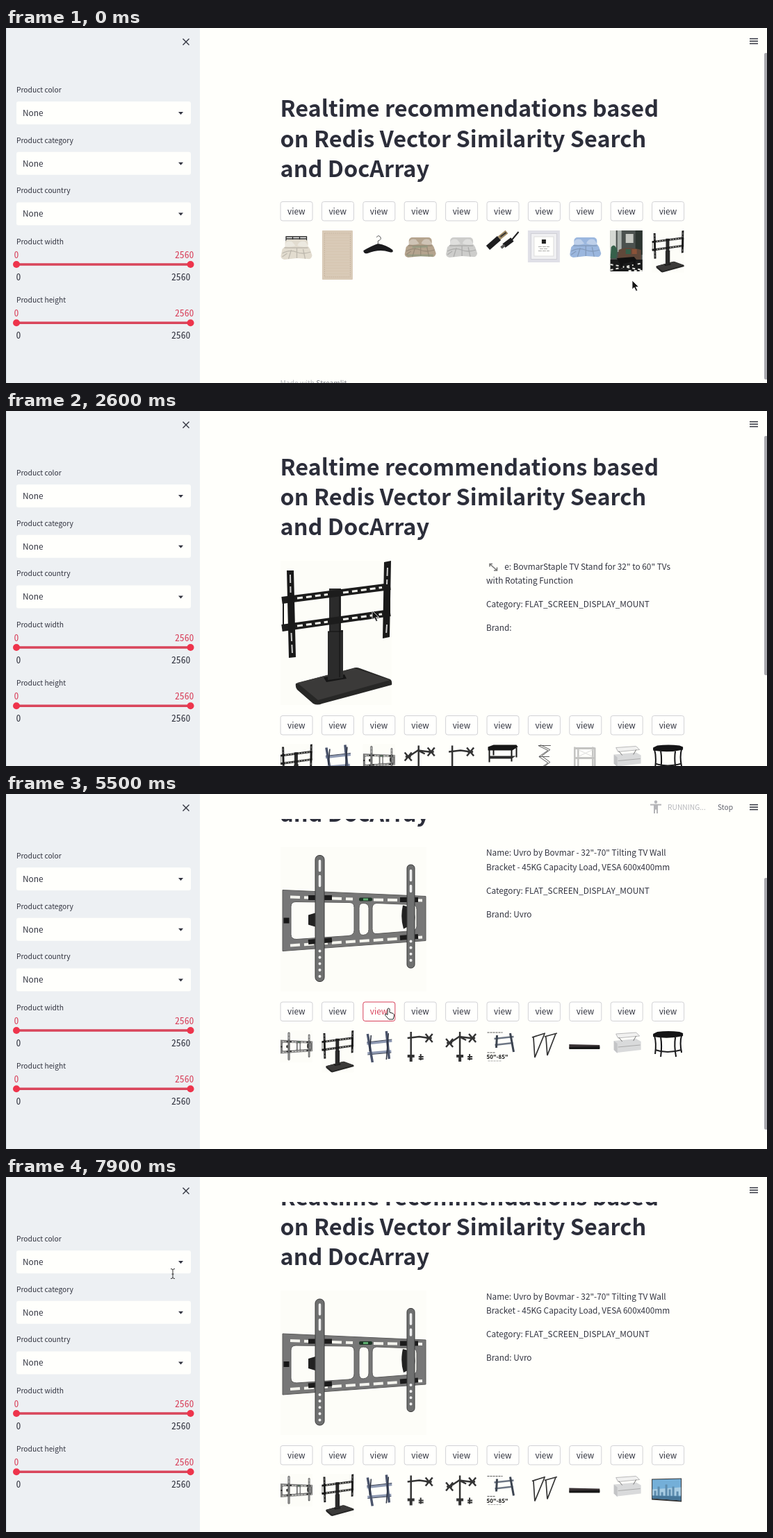
An HTML page that plays this animation: 1095x512 px, repeating every 8000 ms.

```html
<!DOCTYPE html>
<html lang="en">
<head>
<meta charset="utf-8">
<title>Product recommendations</title>
<style>
html, body { margin: 0; width: 100%; height: 100%; overflow: hidden; background: #fffffb }
svg { display: block; width: 1095px; height: 512px; font: 11.83px "Noto Sans CJK SC", "Noto Sans CJK JP", "Noto Sans", sans-serif; fill: #31333f }
.small { font-size: 10.25px }
.mono { font: 13.68px "Noto Sans Mono CJK SC", "Noto Sans Mono CJK JP", monospace }
.title { font-size: 32.45px; font-weight: 700; fill: #2c2e3a }
.red { fill: #d8405a }
.line { fill: none; stroke: currentColor }
.btn rect { fill: #fffffd; stroke: #d2d2d6 }
.btn text { text-anchor: middle }
.btn.hover rect, .btn.focus rect { stroke: #d8405a }
.btn.hover text, .btn.focus text { fill: #d8405a }
.btn.focus rect { stroke: #e5566b; stroke-width: 2; filter: drop-shadow(0 0 1.5px #f0455d) }
</style>
</head>
<body>
<svg viewBox="0 0 1095 512" xmlns="http://www.w3.org/2000/svg">
<defs>
  <clipPath id="view"><rect x="279" y="36" width="816" height="476"/></clipPath>

  <g id="stand">
    <rect width="160" height="208" fill="#fdfdf8"/>
    <path fill="#272726" d="M22 177L104 155Q109 153 114 155L158 171Q161 173 160 179L60 206Q53 209 47 206L24 186Q21 183 22 177Z"/>
    <path fill="#3b3a39" d="M24 176L106 155L158 172L54 201Z"/>
    <path fill="#161616" d="M62 168L92 164L95 170L66 175Z"/>
    <path fill="#2b2b2b" d="M70 40H87V100H90V169L68 172V102H70Z"/>
    <path stroke="#111" d="M68 102H90M85 42V168" fill="none"/>
    <path stroke="#1c1c1c" stroke-width="10" d="M2 57L158 37M2 97L158 75"/>
    <path stroke="#1c1c1c" stroke-width="2" d="M4 56V98M157 37V76"/>
    <path stroke="#f4f4ee" stroke-width="3" stroke-dasharray="8 5" d="M24 54L68 48.500M90 46L146 38.500M24 94L68 88M90 84.500L146 77"/>
    <path fill="#191919" d="M9 14H19L22 139L12 140ZM149 2L159 0L157 110L147 112Z"/>
    <path stroke="#ccc" stroke-width="2" stroke-dasharray="12 5" d="M15.500 104L17 134M153 92L152 107M14 20L14.500 46M154 10L153 34"/>
  </g>

  <g id="bracket">
    <rect width="210" height="208" fill="#fdfdf8"/>
    <path fill="#777" stroke="#5a5a5a" fill-rule="evenodd" d="M3 62L209 71V135L3 150Z
      M22 79Q15 79 15 86V126Q15 133 23 133L98 128Q106 127 106 120V87Q106 80 99 80Z
      M119 81Q113 81 113 88V119Q113 127 119 127Q127 126 127 119V88Q127 81 119 81Z
      M138 81Q132 82 132 88V118Q132 126 139 125L189 121Q196 120 196 114V90Q196 83 189 83Z"/>
    <path stroke="#f4f4ee" stroke-width="4" stroke-dasharray="14 6" d="M14 72L104 75M134 76L204 77M14 142L204 130"/>
    <path stroke="#1b1b1b" stroke-width="7" d="M40 73H74M40 137L74 134M172 76H198M172 131L198 129"/>
    <path fill="#222" d="M40 98L50 95V115L40 112ZM176 84Q172 102 177 118L183 115V86ZM191 88Q196 102 191 114Z"/>
    <g fill="#6f7070" stroke="#3a3a3a">
      <rect x="50" y="12" width="13" height="182" rx="6"/>
      <rect x="182" y="25.500" width="11" height="149" rx="5"/>
    </g>
    <path class="line" color="#eee" stroke-width="3.500" stroke-linecap="round" stroke-dasharray="14 8" d="M56.500 20V62M187.500 34V64"/>
    <path class="line" color="#eee" stroke-width="4" stroke-linecap="round" stroke-dasharray=".1 9" d="M56.500 150V190M187.500 136V170"/>
    <rect x="113" y="73" width="19" height="5" rx="2" fill="#1d3526"/>
    <rect x="119" y="74" width="7" height="3" fill="#5fae70"/>
    <rect x="4.500" y="102" width="8" height="8" fill="#161616"/>
  </g>

  <g id="bed">
    <rect x="7" y="10" width="33" height="14" rx="5" fill="currentColor"/>
    <path fill="currentColor" d="M3 24Q8 18 16 17L32 17Q41 18 43 24L46 33Q45 39 40 38L24 37L6 39Q1 38 1 34Z"/>
    <path fill="#fff" opacity=".35" d="M7 17Q9 11 17 13L22 19Q14 22 7 20ZM25 18Q28 11 36 13L41 20Q32 22 25 19Z"/>
    <path class="line" color="#000" opacity=".16" stroke-width="1.300" d="M3 30Q14 24 23 28T44 28M12 38L16 25M24 37V22M36 38L33 24M3 35L10 30M6 22L40 22"/>
  </g>
  <g id="whiteBed">
    <path class="line" color="#292929" stroke-width="1.300" d="M8.500 25V9H38V24M8.500 12H38M18 9V18M28 9V18"/>
    <use href="#bed" y="3" color="#e2dccf"/>
  </g>
  <g id="brownBed"><use href="#bed" color="#b5a48e"/><path stroke="#86967c" stroke-width="3" opacity=".55" d="M4 36L42 36M12 24L34 23"/></g>
  <use id="greyBed" href="#bed" color="#cdcdcb"/>
  <use id="blueBed" href="#bed" color="#9bb7de"/>
  <g id="rug">
    <rect x="1" width="44" height="71" rx="1" fill="#d9cab7"/>
    <path class="line" color="#c8b59f" stroke-dasharray="2 1" d="M4.500 4H41.500V67H4.500Z"/>
    <path class="line" color="#cdbca6" stroke-width="34" stroke-dasharray="1 3" d="M23 6V66" opacity=".35"/>
  </g>
  <g id="hanger">
    <path fill="#1b1b1d" d="M1 29Q13 22 22 19Q34 21 43 28Q45 33 38 31Q24 26 7 33Q1 34 1 29Z"/>
    <path class="line" color="#555" d="M22 20V15Q28 13 25 9Q22 6 20 10"/>
  </g>
  <g id="cable" fill="none">
    <path stroke="#1d1d1f" stroke-width="8" d="M2 25L18 11"/>
    <path stroke="#a08b66" stroke-width="6" d="M18 11L29 2"/>
    <path stroke="#333" stroke-width="2" d="M20 9L28 3"/>
    <path stroke="#1d1d1f" stroke-width="7" d="M25 22L37 13"/>
    <path stroke="#555" stroke-width="4" d="M21 25L26 21"/>
    <path stroke="#222" stroke-width="2" d="M36 14L46 2"/>
  </g>
  <g id="photoFrame">
    <rect width="46" height="46" fill="#e0e0e7"/>
    <rect x="4.500" y="4.500" width="37" height="37" fill="#f1f1f3" stroke="#cfcfd6"/>
    <rect x="9" y="9" width="28" height="28" fill="#fffffc" stroke="#ddd"/>
    <rect x="20" y="13" width="6" height="6" fill="#222"/>
    <path stroke="#aaa" stroke-dasharray="5 1" d="M15 23.500H31M17 26.500H29M15 29.500H31"/>
  </g>
  <g id="room">
    <rect width="46" height="59" fill="#4b514e"/>
    <path fill="#d5d9d3" d="M0 0H8V34H0Z"/>
    <path fill="#aab1ac" d="M10 0H16V31H10Z"/>
    <path fill="#c6c8c2" d="M22 5H33V18H22Z"/>
    <path fill="#2d3530" d="M36 0H46V35H36Z"/>
    <path fill="#60483a" d="M12 28Q24 22 44 28V43H10Z"/>
    <path fill="#35604a" d="M1 24Q6 17 10 29L8 40H0ZM22 27H29V34H22Z"/>
    <path fill="#8a5238" d="M31 27H38V34H31Z"/>
    <path fill="#1a1b1b" d="M0 42H46V59H0Z"/>
    <path stroke="#e4e4df" stroke-width="2" stroke-dasharray="4 4" d="M0 49L46 57M0 57L46 47M26 58H46"/>
    <path fill="#111" d="M9 40L34 38L38 43L14 49ZM14 46H18V54H14ZM33 43H36V51H33Z"/>
  </g>

  <g id="standThumb"><use href="#stand" transform="scale(.291)"/></g>
  <g id="bracketThumb"><use href="#bracket" transform="scale(.222)"/></g>
  <g id="tilt" fill="none">
    <path stroke="#8f9ab3" stroke-width="3.500" d="M6 19L42 15M7 33L41 30"/>
    <path stroke="#3f4658" d="M6 17L42 13M7 35L41 32"/>
    <path stroke="#4b546b" stroke-width="3.500" d="M7 5L14 46M34 1L38 41"/>
    <path stroke="#252b3a" stroke-width="1.500" d="M12 7L10 30M37 4L34 42"/>
  </g>
  <g id="vesa"><path class="line" stroke-width="2.500" d="M-5 -6L5 6M-5 6L5 -6M-4 0H4"/></g>
  <g id="clamp" color="#333">
    <path class="line" stroke-width="2.500" d="M0 2V36"/>
    <path class="line" stroke-width="4" d="M-5 37H5M0 38V45"/>
    <path class="line" stroke="#777" stroke-width="2" d="M11 38H18M14 34V43M11 41L18 41"/>
  </g>
  <g id="dualArm" color="#333">
    <use href="#clamp" x="21"/>
    <path class="line" stroke-width="2.500" d="M8 17L20 9L36 11M20 9L30 14"/>
    <use href="#vesa" x="6" y="18"/><use href="#vesa" x="39" y="11"/>
  </g>
  <g id="arm" color="#333">
    <use href="#clamp" x="10"/>
    <path class="line" stroke-width="2.500" d="M5 11L22 9L36 11"/>
    <use href="#vesa" x="36" y="11"/>
  </g>
  <g id="coffee">
    <path fill="#161616" d="M2 4L10 1H43L45 4L37 9H2Z"/>
    <path stroke="#161616" stroke-width="2" d="M4 8V26M36 8V25M43 5V19M10 8V16"/>
    <path fill="#2a2a2a" d="M4 17H42L36 21H4Z"/>
  </g>
  <g id="zigzag" class="line" color="#5c5c5c">
    <path d="M15 2L29 9L16 18L29 27L16 36L28 43M18 1L32 8L20 17L32 26L20 35L32 42M15 2H33M16 18H31M15 35H31"/>
    <path stroke-width="2.500" d="M14 44L32 41"/>
  </g>
  <g id="shelf" class="line" color="#c4c4c2">
    <path stroke-width="2.500" d="M8 4V66M34 4V68M13 5V62M37 5V64"/>
    <path stroke-width="3" d="M8 6H37M8 20H37M8 34H37M8 48H37M8 62H37"/>
    <path stroke="#ddd" d="M13 8L34 18M34 8L13 18M13 36L34 46M34 36L13 46"/>
  </g>
  <g id="lift">
    <path fill="#d9dadb" d="M5 15L37 12L44 16V28L10 32L5 28Z"/>
    <path fill="#c3c4c6" d="M5 15L10 19V33L5 28Z"/>
    <path fill="#f1f1f0" stroke="#b9b9ba" d="M8 5L37 3L42 8L11 11Z"/>
    <path class="line" color="#777" d="M12 10L17 16M37 8L33 15"/>
    <path stroke="#aaa" d="M11 24L43 21"/>
  </g>
  <g id="console">
    <path fill="#141416" d="M2 5L8 2Q24 0 40 2L45 4V8Q24 13 2 9Z"/>
    <path class="line" color="#141416" stroke-width="2" d="M4 8Q7 18 5 34M13 10Q15 22 13 38M34 10Q32 22 35 38M43 7Q40 18 43 32"/>
    <path class="line" color="#202022" stroke-width="2" d="M5 28Q22 34 43 28"/>
  </g>
  <g id="wallMount">
    <path class="line" color="#6d7684" stroke-width="2.500" d="M11 12L39 9M12 21L38 18"/>
    <path class="line" color="#3c4450" stroke-width="3" d="M15 7L14 25M34 4L39 31"/>
    <path class="line" color="#555" stroke-dasharray="3 1" d="M1 3H23M1 32H13"/>
    <text x="0" y="41" font-size="8" font-weight="700" fill="#111">50"-85"</text>
    <path class="line" color="#aaa" stroke-dasharray="3 1" d="M2 44H22"/>
  </g>
  <path id="triangles" class="line" color="#333" stroke-width="1.700" d="M6 10L25 4M8 9L10 39L24 5M24 9L42 4M26 9L28 36L40 5"/>
  <g id="ledge"><path fill="#3a3335" d="M0 20L44 21V26L0 25Z"/><path fill="#171717" d="M0 24L44 23V27H0Z"/></g>
  <g id="tv">
    <path fill="#333" d="M0 7L43 6V40L0 37Z"/>
    <path fill="#74afd8" d="M1 8L42 7V38L1 35Z"/>
    <path fill="#a9cde3" d="M1 22L42 19V31H1Z"/>
    <path stroke="#5d8cae" stroke-width="3" d="M5 34V24M10 34V18M15 35V26M21 35V15M26 36V22M31 36V18M37 37V25"/>
    <path fill="#47779a" d="M1 31L42 32V38L1 35Z"/>
  </g>

  <path id="arrow" fill="#151515" stroke="#fff" stroke-width=".8" d="M0 0V13L3 10.300L5.500 15.500L7.800 14.500L5.400 9.500H9.500Z"/>
  <path id="hand" fill="#fff" stroke="#222" d="M0 1Q1.500 -1 3 1V6L8 7.500Q10 8.500 9.500 11L8 16H2L-3 10.500Q-4.500 8 -2 8L0 9.500Z"/>
  <path id="beam" class="line" color="#333" d="M-3 -6.500Q0 -6.500 0 -5Q0 -6.500 3 -6.500M0 -5V6M-3 7.500Q0 7.500 0 6Q0 7.500 3 7.500M-1.500 1H1.500"/>
</defs>

<rect width="1095" height="512" fill="#fffffb"/>
<g id="sidebar">
  <rect width="279" height="512" fill="#edf0f3"/>
  <rect width="1" height="512" fill="#d6dfe6"/>
  <path class="line" color="#31333f" stroke-width="1.400" d="M254.500 15.500L263.500 24.500M263.500 15.500L254.500 24.500"/>
</g>

<g clip-path="url(#view)"><g id="page">
  <g class="title">
    <text x="394.500" y="128">Realtime recommendations based</text>
    <text x="394.500" y="171.500">on Redis Vector Similarity Search</text>
    <text x="394.500" y="214.500">and DocArray</text>
  </g>
  <g id="buttons"></g>
  <g id="views"></g>
  <g id="expand">
    <rect x="690" y="249" width="27" height="22" fill="#fffffb"/>
    <path class="line" color="#777" stroke-width="1.600" d="M696 260V256H700M696.500 256.500L706 265M706.500 261V265.500H702"/>
  </g>
</g></g>

<path class="line" color="#31333f" stroke-width="1.400" d="M1070 15.500H1082M1070 19H1082M1070 22.500H1082"/>
<g id="running" class="small">
  <g fill="#b5b5b8"><circle cx="935" cy="11.500" r="2.200"/><path d="M927 14.500H943V16.500H938V28H936V22.500H934V28H932V16.500H927Z"/></g>
  <text x="952" y="23" fill="#b5b6bb">RUNNING...</text>
  <text x="1024" y="23" fill="#62646e">Stop</text>
</g>
<rect id="thumb" x="1091" width="5" rx="2" fill="#a8a8ad"/>
<use id="cursor"/>
</svg>

<script>
const $ = id => document.getElementById(id);
const STEP = 59.4, LEFT = 394.5;
const text = (x, y, s, attrs = '') => `<text x="${x}" y="${y}" ${attrs}>${s}</text>`;

['color', 'category', 'country'].forEach((name, i) => {
  const y = 72.7 * i;
  $('sidebar').innerHTML += text(15, 93 + y, 'Product ' + name, 'class="small"') +
    `<rect x="15" y="${106 + y}" width="251" height="33" rx="3" fill="#fffffc"/>` +
    text(24, 127 + y, 'None') + `<path d="M248 ${121 + y}h7l-3.5 4z"/>`;
});
['width', 'height'].forEach((name, i) => {
  const y = 84.3 * i;
  $('sidebar').innerHTML += text(15, 311.5 + y, 'Product ' + name, 'class="small"') +
    `<g class="mono">${text(11.5, 332 + y, 0, 'class="red"')}${text(243, 332 + y, 2560, 'class="red"')}
     ${text(14.5, 364 + y, 0)}${text(238, 364 + y, 2560)}</g>
     <path stroke="#d9455a" stroke-width="3.5" d="M15 ${341 + y}H265"/>
     <g fill="#ee344c"><circle cx="15" cy="${341 + y}" r="5"/><circle cx="265.5" cy="${341 + y}" r="5"/></g>`;
});

for (let i = 0; i < 10; i++)
  $('buttons').innerHTML += `<g class="btn" transform="translate(${LEFT + STEP * i})">
    <rect x=".5" y=".5" width="46" height="27.5" rx="3"/>${text(23.3, 18.5, 'view')}</g>`;
const buttons = [...$('buttons').children];

const row = (names, y) => names.split(' ').map((n, i) =>
  `<use href="#${n}" x="${LEFT + STEP * i}" y="${y}"/>`).join('');
const detail = (image, lines) => `<use href="#${image}" x="395" y="251.5"/>` +
  lines.map((s, i) => text(691, [264, 284.5, 318.5, 352.5][i], s)).join('');
const category = 'Category: FLAT_SCREEN_DISPLAY_MOUNT';
const views = [
  row('whiteBed rug hanger brownBed greyBed cable photoFrame blueBed room standThumb', 292) +
    text(LEFT, 515.5, 'Made with <tspan fill="#7d7f88">Streamlit</tspan>', 'class="small" fill="#b4b5ba"'),
  detail('stand', ['Name: BovmarStaple TV Stand for 32" to 60" TVs', 'with Rotating Function', category, 'Brand:']) +
    row('standThumb tilt bracketThumb dualArm arm coffee zigzag shelf lift console', 516),
  detail('bracket', ['Name: Uvro by Bovmar - 32"-70" Tilting TV Wall', 'Bracket - 45KG Capacity Load, VESA 600x400mm', category, 'Brand: Uvro']) +
    row('bracketThumb standThumb tilt arm dualArm wallMount triangles ledge lift', 516) +
    `<use id="last" x="${LEFT + STEP * 9}" y="516"/>`
];
$('views').innerHTML = views.map(v => `<g>${v}</g>`).join('');

// Keys are [time, ...values], joined by straight lines.
const pointer = [[0, 901, 364], [400, 944, 297], [500, 944, 297], [1100, 955, 267], [1700, 955, 267],
  [2400, 527, 288], [2800, 527, 288], [3400, 376, 365], [3900, 376, 365], [4700, 549, 309], [5800, 549, 309],
  [6100, 425, 328], [6200, 425, 328], [6500, 329, 290], [6600, 338, 288], [7300, 338, 288],
  [7600, 142, 160], [7700, 240, 139]];
const scroll = [[2400, 0], [2600, 35.5], [3300, 175], [7000, 175], [7100, 162.5], [7200, 87.5]];
const bar = [[1800, 36, 471], [1900, 36, 345], [2600, 36, 345], [3300, 119, 359], [5400, 119, 359],
  [5500, 121, 363], [7000, 121, 363], [7100, 111, 364], [7200, 59, 365]];
const fade = [[7300, 1], [7700, 0]];

function at(keys, t) {
  const i = keys.findIndex(k => k[0] > t);
  const b = keys.at(i), a = i > 0 ? keys[i - 1] : b;
  const f = a === b ? 0 : (t - a[0]) / (b[0] - a[0]);
  return a.slice(1).map((v, j) => v + (b[j + 1] - v) * f);
}
const show = (el, on) => el.style.display = on ? '' : 'none';
const within = (t, a, b) => t >= a && t < b;

function draw() {
  const t = Math.floor(performance.now() % 8000 / 100) * 100;
  const view = t < 1900 ? 0 : t < 5500 ? 1 : 2;
  const [x, y] = at(pointer, t), [top] = at(scroll, t), [barY, barH] = at(bar, t);
  const buttonY = view ? 474.5 : 250;

  $('page').setAttribute('transform', `translate(0 ${-top})`);
  $('buttons').setAttribute('transform', `translate(0 ${buttonY})`);
  [...$('views').children].forEach((g, i) => show(g, i === view));
  $('last').setAttribute('href', t < 5600 ? '#console' : '#tv');
  show($('running'), within(t, 1600, 2300) || within(t, 5400, 5700));
  show($('expand'), view === 1 && within(t, 2300, 3200));

  const focus = within(t, 1200, 1900) ? 9 : within(t, 5100, 5500) ? 2 : -1;
  let hovered = false;
  buttons.forEach((b, i) => {
    const hover = within(x - LEFT - STEP * i, 0, 47) && within(y + top - buttonY, 0, 28);
    hovered ||= hover;
    b.setAttribute('class', 'btn' + (hover ? ' hover' : '') + (i === focus ? ' focus' : ''));
  });

  $('thumb').setAttribute('y', barY);
  $('thumb').setAttribute('height', barH);
  $('thumb').setAttribute('opacity', at(fade, t)[0]);
  $('cursor').setAttribute('href', hovered ? '#hand' : t >= 7900 ? '#beam' : '#arrow');
  $('cursor').setAttribute('transform', `translate(${x} ${y})`);
  requestAnimationFrame(draw);
}
draw();
</script>
</body>
</html>
```
